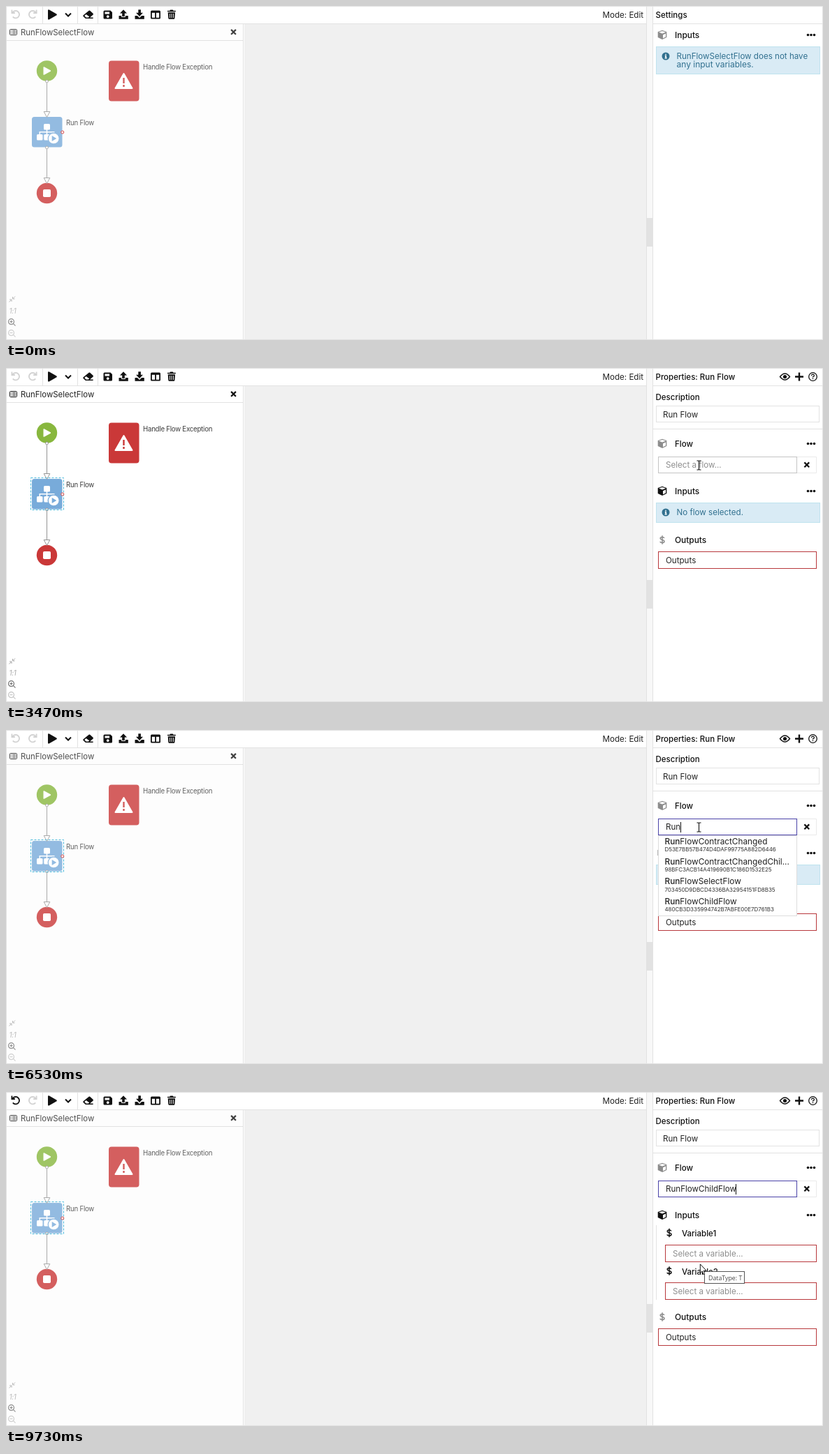
Write an HTML page that moves like this. It is 1169 px wide and 479 px high and loops after 10000 ms.

```html
<!DOCTYPE html>
<html lang="en">
<head>
<meta charset="utf-8">
<title>Run Flow</title>
<style>
html, body { margin: 0; width: 100%; height: 100%; overflow: hidden; background: #fff; }
svg { display: block; }
text { font: 11.6px Inter, "Open Sans", sans-serif; fill: #222; white-space: pre; }
.m { font-weight: 500; font-size: 11.5px; fill: #111; }
.node { font-size: 9.7px; letter-spacing: -.25px; fill: #3c3c3c; }
.info { fill: #31708f; }
.ph { fill: #8d8d8d; }
.id { font-size: 8px; letter-spacing: -.05px; fill: #333; }
.row { font-size: 11.8px; }
.ln { fill: none; stroke: #e2e2e2; }
.red { fill: #fff; stroke: #b8383c; }
.box { fill: #d9ebf5; stroke: #bfe3ee; }
.k { fill: none; stroke: #111; }
</style>
</head>
<body>
<svg width="1169" height="479" viewBox="0 0 1169 479">
<defs>
  <g id="dots" fill="#111"><circle cx="-4.5" r="1.8"/><circle r="1.8"/><circle cx="4.5" r="1.8"/></g>
  <g id="cube">
    <path d="M0-6.5 6.3-4.2V3.6L0 6.8-6.3 3.6V-4.2Z"/>
    <path d="M-5-3.7 0-1.7 5-3.7 0-5.3ZM1 0V5L5 3V-1.7Z" fill="#fff"/>
  </g>
  <path id="cross" d="M-3.4-3.4 3.4 3.4M3.4-3.4-3.4 3.4" class="k" stroke-width="2.2"/>
  <g id="note"><circle r="5.5" fill="#31708f"/><path d="M0-3.2V-1.4M-1.2-.2H.2V3M-1.4 2.8H1.6" stroke="#fff" stroke-width="1.5" fill="none"/></g>
  <path id="buck" fill="none" stroke-width="1.5" d="M2.8-2.6C2.2-4.4-2.8-4.6-2.8-2.2-2.8.4 3 -.6 3 2.2 3 4.6-2.6 4.6-3 2.4M0-6.3V6.3"/>
  <g id="wire" fill="#fff" stroke="#959595"><path d="M0 2V44"/><path d="M-4.3 43.5H4.3L0 51.5Z"/><circle r="1.9"/></g>
  <g id="lens" fill="none" stroke-width="1.2"><circle cx="-.8" cy="-.8" r="4"/><path d="M2.2 2.2 5.2 5.2M-2.8-.8H1.2"/></g>
  <path id="turn" fill="none" stroke-width="1.8" d="M9.6 9.2A5.2 5.2 0 1 1 9.8 15.4M8.4 5.6V10H12.8"/>
</defs>

<path class="ln" d="M0 .5H1169M.5 0V479"/>
<rect x="341" y="26" width="575" height="453" fill="#f0f0f0"/>
<rect x="917" y="1" width="8" height="478" fill="#f8f8f8"/>
<rect x="916" y="304" width="9" height="41" fill="#e2e2e2"/>

<!-- toolbar -->
<use id="undo" href="#turn"/>
<use href="#turn" stroke="#d2d2d2" transform="matrix(-1 0 0 1 52 0)"/>
<path class="k" stroke-width="2" d="M85 10.5 89 14.5 93 10.5"/>
<path class="ln" d="M52.5 1V25M102.5 1V25M131.5 1V25"/>
<g fill="#111">
  <path d="M60 6.2Q60 4.8 61.5 5.3L72.4 11.4Q73.4 12.3 72.4 13.2L61.5 19.4Q60 20 60 18.5Z"/>
  <path d="M118.8 6.4H120L124.8 11Q125.2 11.8 124.6 12.5L120 16.5H124.6V18H113.8L110.4 14.7Q110 14 110.6 13.2ZM114.6 12 112.3 14.1 114.6 16.4H117.8L119.2 15.3Z" fill-rule="evenodd"/>
  <path d="M141 6.5H149.5L152 9V17Q152 18.5 150.5 18.5H141Q139.5 18.5 139.5 17V8Q139.5 6.5 141 6.5ZM141.5 8.5V11.5H148V8.5ZM145.7 13.2A1.9 1.9 0 1 0 145.71 13.2Z" fill-rule="evenodd"/>
  <path d="M168 5.2 173 10.4H169.8V15H166.2V10.4H163Z"/>
  <path d="M161.5 14H165.2V16H170.8V14H174.8V18.7H161.5Z"/>
  <path d="M189.3 5.2H192.9V9.8H196L191 15 186 9.8H189.3Z"/>
  <path d="M184.5 14H188L191 17 194 14H197.8V18.7H184.5Z"/>
  <path d="M208.5 6.5H219.5Q221 6.5 221 8V17Q221 18.5 219.5 18.5H208.5Q207 18.5 207 17V8Q207 6.5 208.5 6.5ZM208.8 9.7V16.8H213.1V9.7ZM214.9 9.7V16.8H219.2V9.7Z" fill-rule="evenodd"/>
  <path d="M231 6.7H234.3L235 5.5H238.8L239.5 6.7H242.8V8.3H231ZM231.7 9.3H242L241.4 17.6Q241.3 18.8 240.1 18.8H233.6Q232.4 18.8 232.3 17.6ZM233.9 11V17H234.8V11ZM236.4 11V17H237.3V11ZM238.9 11V17H239.8V11Z" fill-rule="evenodd"/>
</g>
<text x="853.5" y="17">Mode: Edit</text>

<!-- flow canvas -->
<rect id="paper" x="1" y="26" width="338" height="452"/>
<path class="ln" d="M0 25.5H916M1 49.5H339M339.5 26V479M0 478.5H1169M916.5 1V479M925.5 1V479M925 25.5H1169M1168.5 0V479"/>
<g id="flow">
  <g class="k"><rect x="5.5" y="33.5" width="10" height="8" rx="1"/><path d="M7 35.5H8M9 35.5H14M7 37.5H8M9 37.5H14M7 39.5H8M9 39.5H14" stroke-width=".8"/></g>
  <text x="21" y="41.5" style="font-size:11.4px">RunFlowSelectFlow</text>
  <use href="#cross" x="325.5" y="37.3"/>
  <circle cx="58.5" cy="93" r="14.7" fill="#88b73e"/>
  <path d="M53.5 88Q53.5 86.8 54.6 87.3L63.8 92.3Q64.6 93 63.8 93.7L54.6 98.7Q53.5 99.2 53.5 98Z" fill="#fff"/>
  <circle cx="58.5" cy="268.5" r="14.7" fill="#ca3838"/>
  <rect x="53" y="263" width="11" height="11" rx="1.8" fill="#fff"/>
  <rect x="37" y="159" width="43.5" height="43.5" rx="3.5" fill="#78abda"/>
  <g fill="#fff">
    <rect x="54" y="169" width="9" height="8.5" rx="1.5"/>
    <rect x="44" y="184" width="8.5" height="8.5" rx="1.5"/>
    <rect x="54.3" y="184" width="8.5" height="8.5" rx="1.5"/>
    <path d="M48.3 184V180.7H68.7V184M58.5 177V184" fill="none" stroke="#fff" stroke-width="1.5"/>
    <circle cx="68.2" cy="190" r="8" stroke="#78abda" stroke-width="1.3"/>
  </g>
  <path d="M65.7 186 72.3 190 65.7 194Z" fill="#78abda"/>
  <use href="#wire" x="58.5" y="108"/>
  <use href="#wire" x="58.5" y="203"/>
  <rect x="147" y="78.5" width="43.5" height="58" rx="4" fill="#ca3838"/>
  <path d="M168.5 97 180.5 118H156.5Z" fill="#fff" stroke="#fff" stroke-width="2" stroke-linejoin="round"/>
  <path d="M168.5 103V111M168.5 113V116" stroke="#ca3838" stroke-width="2.4"/>
  <text class="node" x="196" y="90.5">Handle Flow Exception</text>
  <text class="node" x="86" y="171">Run Flow</text>
  <path d="M4.5 424.5 8 421M8 424V421H5M13 416.5 9.5 420M9.5 417V420H12.5" fill="none" stroke="#aaa"/>
  <text x="4.5" y="441" style="font-size:10px;font-style:italic;fill:#aaa;letter-spacing:-.3px">1:1</text>
  <g stroke="#777"><use href="#lens" x="8.3" y="453.5"/><path d="M7.5 450.7V454.7" stroke-width="1.2"/></g>
  <use href="#lens" x="8.3" y="469.5" stroke="#c6c6c6"/>
</g>
<rect data-on="1800" x="35.5" y="157.5" width="47" height="46" fill="none" stroke="#4fbbdc" stroke-dasharray="3 2"/>
<circle cx="80.8" cy="181" r="2" fill="#fff" stroke="#d64848"/>

<!-- settings -->
<g data-on="0 2000">
  <text class="m" x="929.5" y="17">Settings</text>
  <use href="#cube" x="939" y="41.3" fill="#8c8c8c"/>
  <text class="m" x="957" y="46" style="font-size:11.9px">Inputs</text>
  <use href="#dots" x="1152" y="41.5"/>
  <rect class="box" x="930.5" y="58.5" width="234" height="39"/>
  <use href="#note" x="944" y="72"/>
  <text class="info" x="959.5" y="76">RunFlowSelectFlow does not have</text>
  <text class="info" x="959.5" y="87.7" style="font-size:12px">any input variables.</text>
</g>

<!-- properties -->
<g data-on="2000">
  <text class="m" x="929.5" y="17">Properties: Run Flow</text>
  <path d="M1107.5 12.5Q1114.5 3.5 1121.5 12.5 1114.5 21.5 1107.5 12.5Z" class="k" stroke-width="1.4"/>
  <circle cx="1114.5" cy="12.5" r="2.6" fill="#111"/>
  <path class="k" d="M1129 12.5H1141M1135 6.5V18.5" stroke-width="2.4"/>
  <g class="k" stroke-width="1.3"><circle cx="1154.5" cy="12.5" r="5.8"/><path d="M1152.5 11Q1152.7 9.2 1154.5 9.2 1156.4 9.2 1156.4 10.9 1156.4 12.2 1154.5 12.7V13.6M1154.5 14.6V16"/></g>
  <text class="m" x="929.5" y="46">Description</text>
  <rect class="ln" x="930.5" y="54.5" width="233" height="23"/>
  <text x="940" y="70.5">Run Flow</text>
  <path class="ln" d="M926 87.5H1168"/>
  <use href="#cube" x="939" y="108.3" fill="#8c8c8c"/>
  <text class="m" x="957" y="113">Flow</text>
  <use href="#dots" x="1152" y="108.5"/>
  <path class="ln" d="M1132 127.5H1159.5V150.5H1132" stroke-opacity=".7"/>
  <use href="#cross" x="1145.8" y="138.8"/>
  <rect id="field" x="933.5" y="127.5" width="198" height="23" fill="#fff"/>
  <text id="typed" x="944" y="143"></text>
  <path id="caret" stroke="#111"/>
  <use href="#cube" x="939" y="176.3" fill="#111"/>
  <text class="m" x="957" y="181" style="font-size:11.9px">Inputs</text>
  <use href="#dots" x="1152" y="176.5"/>
  <g data-on="0 8870">
    <rect class="box" x="930.5" y="193.5" width="234" height="28"/>
    <use href="#note" x="944" y="207"/>
    <text class="info" x="959.5" y="211.3">No flow selected.</text>
  </g>
  <g data-on="8870">
    <path class="ln" d="M930.5 191V298"/>
    <use href="#buck" x="949" y="202" stroke="#111"/>
    <text class="m" x="967" y="207">Variable1</text>
    <rect class="red" x="943.5" y="219.5" width="216" height="24"/>
    <text class="ph" x="954" y="236">Select a variable...</text>
    <use href="#buck" x="949" y="256.5" stroke="#111"/>
    <text class="m" x="967" y="261.5">Variable2</text>
    <rect class="red" x="943.5" y="273.5" width="216" height="24"/>
    <text class="ph" x="954" y="290">Select a variable...</text>
  </g>
  <g id="outs">
    <use href="#buck" x="939" y="246.5" stroke="#8c8c8c"/>
    <text class="m" x="957" y="251.3" style="font-size:11.9px">Outputs</text>
    <rect class="red" x="933.5" y="263.5" width="226" height="24"/>
    <text x="944" y="280">Outputs</text>
  </g>
</g>

<!-- suggestions -->
<g data-on="3800 8670">
  <clipPath id="clip"><rect id="cut" x="933" y="152" width="199" height="178"/></clipPath>
  <rect id="menu" x="933.5" y="151.5" width="198" fill="#fff" stroke="#ddd"/>
  <rect id="hover" x="934" width="197" height="28.8" fill="#eee"/>
  <g id="rows" clip-path="url(#clip)"></g>
  <g data-on="0 5200">
    <rect x="1119" y="152" width="12" height="177" fill="#f1f1f1"/>
    <path d="M1121.8 159.5 1124.8 156 1127.8 159.5Z" fill="#888"/>
    <path d="M1121.8 321.5 1124.8 325 1127.8 321.5Z" fill="#444"/>
    <rect id="thumb" x="1120" y="163.5" width="10" fill="#c1c1c1"/>
  </g>
</g>

<!-- pointers -->
<g id="ptr" stroke-linejoin="round">
  <path id="arrow" d="M.3.3V13.2L3.2 10.5 5.1 15 7.1 14.1 5.2 9.8H9.2Z" fill="#fff" stroke="#111"/>
  <path id="move" d="M0-8.5 3.2-5H1.2V-1.2H5V-3.2L8.5 0 5 3.2V1.2H1.2V5H3.2L0 8.5-3.2 5H-1.2V1.2H-5V3.2L-8.5 0-5-3.2V-1.2H-1.2V-5H-3.2Z" fill="#fff" stroke="#222"/>
  <path id="beam" d="M-3-6.5H-1L0-6 1-6.5H3M-3 6.5H-1L0 6 1 6.5H3M0-6V6" fill="none" stroke="#111" stroke-width="1.1"/>
</g>
<g data-on="9400">
  <rect x="999.5" y="257.5" width="57" height="17" fill="#fff" stroke="#555"/>
  <text x="1005" y="270" style="font:8.8px 'Open Sans',sans-serif;fill:#444">DataType: T</text>
</g>
</svg>
<script>
const $ = id => document.getElementById(id);
const set = (id, attrs) => { for (const k in attrs) $(id).setAttribute(k, attrs[k]); };
const show = (el, on) => { el.style.display = on ? '' : 'none'; };

const all = [
  ['EditorTypes', '445BA87CC43E43E7BF1EA8972B24A236'],
  ['WhatIsAVariable', '0C54E508958C48FC9510C3AAF253119A'],
  ['SetVariable', '64F362BF43FF4DC2BE4B6F0A361868B5'],
  ['SetVariable-Properties', '613BBFA8564745B6BA9E4F793134E5F2'],
  ['Workspace', '003E23A6F90E4CE7B5572BBE1FAEE996'],
  ['ChildExecutionInGrid', '5EDECF56CC854CD9872FB4485DA86682'],
  ['DiscardedVariable', '']
];
const runs = [
  ['RunFlowContractChanged', 'D53E7BB57B474D4DAF99775A882D6446'],
  ['RunFlowContractChangedChil...', '98BFC3ACB14A419690B1C186D1532E25'],
  ['RunFlowSelectFlow', '703450D9DBCD4336BA32954151FD8B35'],
  ['RunFlowChildFlow', '480CB3D335994742B7ABFE00E7D761B3']
];
// time, field text, caret x
const typing = [
  [0, '', 944.5], [4930, 'R', 951.5], [5200, 'Ru', 958.5],
  [5470, 'Run', 965.5], [8670, 'RunFlowChildFlow', 1044.5]
];
const blinks = [3670, 4200, 4730, 6000, 6530, 7070, 7600, 8130, 8600, 9200, 9730];
// time, x, y
const path = [
  [530, 897, 435], [670, 800, 405], [870, 540, 325], [1070, 250, 232],
  [1200, 110, 190], [1330, 63, 179], [1400, 59.5, 183.5], [2400, 59.5, 183.5],
  [2530, 105, 191], [2670, 320, 198], [2870, 760, 180], [3000, 1020, 145],
  [3130, 1140, 128], [3270, 1075, 131], [3400, 1000, 138], [3470, 991.5, 139.5],
  [7000, 991.5, 139.5], [7130, 995, 157], [7330, 999.5, 199.5],
  [7530, 997, 228], [7800, 993, 246.5]
];
const PITCH = 28.8;
const timed = [...document.querySelectorAll('[data-on]')].map(el => {
  const [from, to = 1e9] = el.dataset.on.split(' ').map(Number);
  return { el, from, to };
});

function at(t) {
  const i = path.findIndex(p => p[0] > t);
  if (i < 0) return path[path.length - 1].slice(1);
  if (!i) return path[0].slice(1);
  const [a, b] = [path[i - 1], path[i]], k = (t - a[0]) / (b[0] - a[0]);
  return [a[1] + (b[1] - a[1]) * k, a[2] + (b[2] - a[2]) * k];
}

let listed;
function fillRows(word) {
  if (listed === word) return;
  listed = word;
  const few = word.length > 1, h = few ? 115 : 178;
  $('rows').innerHTML = (few ? runs : all).map(([name, id], i) => {
    const n = name.startsWith(word) ? word.length : 0, y = 163.7 + i * PITCH;
    return `<text class="row" x="942.5" y="${y}"><tspan font-weight="500">${name.slice(0, n)}</tspan>${name.slice(n)}</text>` +
      `<text class="id" x="942.5" y="${y + 10.2}">${id}</text>`;
  }).join('');
  set('menu', { height: h });
  set('cut', { height: h });
  set('thumb', { height: word ? 45.5 : 38 });
}

function draw(ms) {
  // the screen advances fifteen times a second
  const t = Math.floor((ms + 4) * .015) / .015 + 4;
  for (const { el, from, to } of timed) show(el, t >= from && t < to);

  const lit = t >= 1800 && t < 3670;
  set('flow', { opacity: lit ? 1 : .8 });
  set('paper', { fill: lit ? '#fff' : '#fdfdfd' });
  set('undo', { stroke: t >= 8870 ? '#111' : '#d2d2d2' });
  set('outs', { transform: `translate(0 ${t >= 8870 ? 76 : 0})` });

  const [, word, cx] = typing.filter(s => t >= s[0]).pop();
  $('typed').textContent = word || 'Select a flow...';
  set('typed', { class: word ? '' : 'ph' });
  set('field', { stroke: t >= 3670 ? '#4a43a8' : '#c4c4c4' });
  set('caret', { d: `M${cx} 132V147` });
  show($('caret'), blinks.filter(b => t >= b).length % 2);
  fillRows(word);

  const [x, y] = at(t), row = Math.floor((y - 152) / PITCH);
  show($('hover'), t >= 7070 && row >= 0 && row < 4);
  set('hover', { y: 152 + row * PITCH });

  const inField = t > 2470 && x > 933 && x < 1132 && y > 127 && y < 152;
  const kind = t >= 1730 && t < 2070 ? 'move' : inField ? 'beam' : 'arrow';
  for (const k of ['arrow', 'move', 'beam']) show($(k), k === kind);
  show($('ptr'), t >= 530);
  set('ptr', { transform: `translate(${x} ${y})` });
}

const start = performance.now();
function tick() {
  draw((performance.now() - start) % 10000);
  requestAnimationFrame(tick);
}
tick();
</script>
</body>
</html>
```
